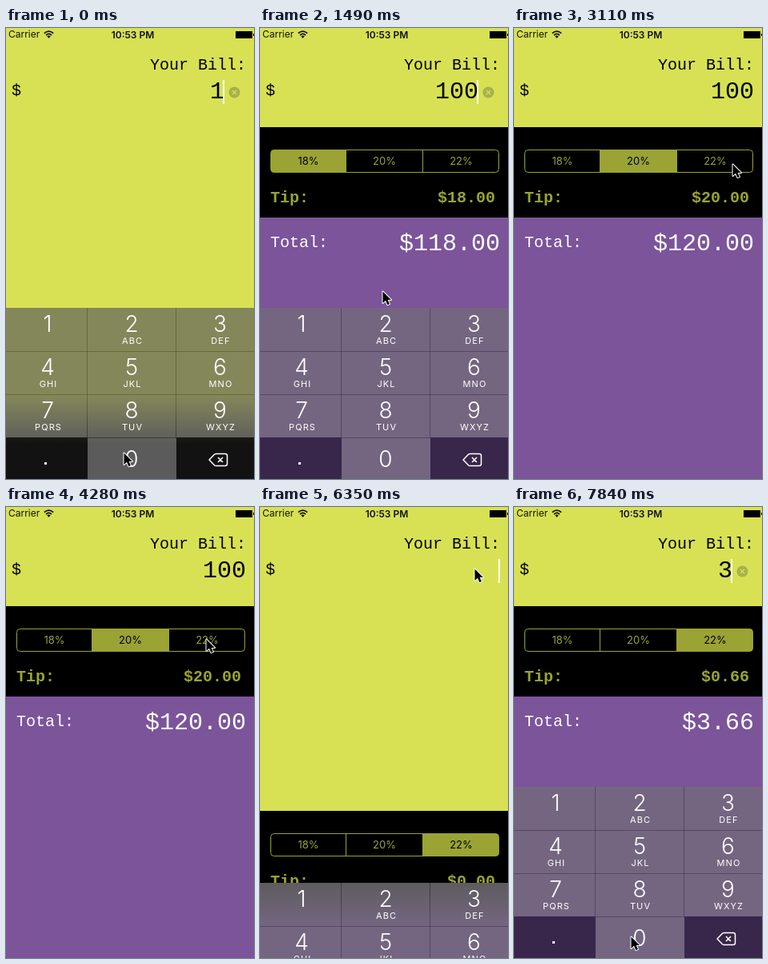
Write an HTML page with a canvas that moves like this. It is 310 by 564 pixels and loops after 7990 ms.

```html
<!DOCTYPE html>
<html lang="en">
<head>
<meta charset="utf-8">
<title>Tip calculator</title>
<style>
  html, body { margin: 0; width: 100%; height: 100%; overflow: hidden; background: #d8e154; }
  canvas { display: block; width: 310px; height: 564px; }
</style>
</head>
<body>
<canvas id="stage"></canvas>
<script>
const W = 310, H = 564, LOOP = 7990, STEPS = 54;
const MONO = '"Courier New", Courier, "Liberation Mono", monospace';
const SANS = 'Inter, Roboto, sans-serif';
const YELLOW = '#d8e154', PURPLE = '#7b549a', OLIVE = '#9aa334';
// Keyboard tints over each backdrop: yellow, black, purple
const LIGHT = ['#84875a', '#5b5b5b', '#746680'];
const DARK = ['#4d500c', '#121212', '#38264b'];

// Tracks: [step, value...], linear between entries
const panelTrack = [[0, 490], [1, 210], [2, 124], [41, 124], [42, 380], [43, 620],
  [48, 620], [49, 490], [50, 210], [51, 124]];
const keyboardTrack = [[0, 350], [10, 350], [11, 390], [12, 500], [13, 564],
  [41, 564], [42, 470], [43, 374], [44, 350]];
const pointerTrack = [[0, 147, 531], [1, 147, 533], [2, 150, 536], [7, 150, 536],
  [10, 153, 329], [13, 153, 329], [16, 152, 165], [18, 152, 165], [21, 273, 170],
  [23, 250, 200], [25, 238, 206], [26, 238, 206], [29, 250, 165], [31, 250, 165],
  [34, 41, 169], [35, 41, 169], [36, 80, 120], [37, 165, 70], [38, 245, 54],
  [39, 268, 77], [43, 268, 77], [47, 268, 372], [49, 268, 372], [52, 152, 528], [53, 146, 537]];
// Switches: [step, value], held until the next entry
const billTrack = [[0, '1'], [2, '10'], [6, '100'], [42, ''], [49, '3']];
const rateTrack = [[0, 0], [17, 1], [30, 2]];
const editTrack = [[0, true], [11, false], [42, true]];
const pressTrack = [[0, ''], [1, '0'], [2, ''], [5, '0'], [6, ''], [48, '3'], [49, '']];

const RATES = [18, 20, 22];
const LETTERS = ['', 'ABC', 'DEF', 'GHI', 'JKL', 'MNO', 'PQRS', 'TUV', 'WXYZ'];
const COLS = [0, 102, 213, W], CENTERS = [52, 157, 267.5], ROW = 54;

const canvas = document.getElementById('stage');
const ctx = canvas.getContext('2d');
const scale = window.devicePixelRatio || 1;
canvas.width = W * scale;
canvas.height = H * scale;

const held = (track, step) => track.filter(k => k[0] <= step).pop()[1];

function glide(track, step) {
  const i = track.findIndex(k => k[0] > step);
  if (i < 0) return track[track.length - 1].slice(1);
  const a = track[i - 1], b = track[i], p = (step - a[0]) / (b[0] - a[0]);
  return a.slice(1).map((v, j) => v + (b[j + 1] - v) * p);
}

function rect(x, y, w, h, color) {
  ctx.fillStyle = color;
  ctx.fillRect(x, y, w, h);
}

function text(str, x, y, font, color, align = 'left', spacing = 0) {
  ctx.font = font;
  ctx.fillStyle = color;
  ctx.textAlign = align;
  ctx.letterSpacing = spacing + 'px';
  ctx.fillText(str, x, y);
}

function stroke(color, width, path) {
  ctx.strokeStyle = color;
  ctx.lineWidth = width;
  ctx.stroke(new Path2D(path));
}

function statusBar() {
  text('Carrier', 3, 12, `12px ${SANS}`, '#111');
  text('10:53 PM', 158.5, 12.5, `600 12px ${SANS}`, '#111', 'center');
  stroke('#111', 1.7, 'M47.8 6.6Q53.5 1.5 59.2 6.6M50 9Q53.5 5.8 57 9');
  ctx.fillStyle = '#111';
  ctx.fill(new Path2D('M51.3 10.4Q53.5 8.6 55.7 10.4L53.5 12.7Z'));
  rect(287, 4, 21, 9, '#000');
  rect(309, 7, 1, 3, '#000');
}

function billField(bill, editing) {
  text('Your Bill:', 300, 52, `20px ${MONO}`, '#000', 'right');
  text('$', 7, 84, `20px ${MONO}`, '#000');
  const clearable = editing && bill;
  text(bill, clearable ? 273 : 300, 88, `30px ${MONO}`, '#000', 'right');
  if (editing) rect(clearable ? 271 : 298, 65, 2, 30, '#fff');
  if (clearable) {
    ctx.fillStyle = '#a9b04d';
    ctx.beginPath();
    ctx.arc(285.5, 80.5, 7, 0, 7);
    ctx.fill();
    stroke(YELLOW, 1.2, 'M283 78l5 5m0 -5l-5 5');
  }
}

function resultPanel(top, bill, selected) {
  const tip = bill * RATES[selected] / 100, money = v => '$' + v.toFixed(2);
  const edges = [13, 107.5, 203.5, 299];
  ctx.save();
  ctx.translate(0, top - 124);
  rect(0, 124, W, 113, '#000');
  rect(0, 237, W, 600, PURPLE);
  ctx.save();
  ctx.beginPath();
  ctx.roundRect(13.5, 152.5, 285, 28, 4);
  ctx.clip();
  rect(edges[selected], 152, edges[selected + 1] - edges[selected], 29, OLIVE);
  ctx.restore();
  ctx.strokeStyle = OLIVE;
  ctx.lineWidth = 1;
  ctx.stroke();
  stroke(OLIVE, 1, 'M107.5 152V181M203.5 152V181');
  RATES.forEach((rate, i) => text(rate + '%', [60.5, 155.5, 251.5][i], 171,
    `13px ${SANS}`, i === selected ? '#000' : OLIVE, 'center'));
  text('Tip:', 13, 218, `bold 20px ${MONO}`, OLIVE);
  text(money(tip), 294, 218, `bold 20px ${MONO}`, OLIVE, 'right');
  text('Total:', 13, 274, `20px ${MONO}`, '#fff');
  text(money(Number(bill) + tip), 300, 278, `30px ${MONO}`, '#fff', 'right');
  ctx.restore();
}

// Blurred backdrop: the panel edges show through the keys as soft transitions
function backdrop(tints, panelTop) {
  const g = ctx.createLinearGradient(0, panelTop - 30, 0, panelTop + 143);
  [[0, 0], [60 / 173, 1], [113 / 173, 1], [1, 2]].forEach(([p, i]) => g.addColorStop(p, tints[i]));
  return g;
}

function keyboard(top, panelTop, pressed) {
  if (top >= H) return;
  const light = backdrop(LIGHT, panelTop), dark = backdrop(DARK, panelTop);
  const labels = [...'123456789.0', 'del'];
  labels.forEach((label, i) => {
    const col = i % 3, y = top + Math.floor(i / 3) * ROW, x = CENTERS[col];
    const isDark = label === '.' || label === 'del' || label === pressed;
    rect(COLS[col], y, COLS[col + 1] - COLS[col], ROW, isDark ? dark : light);
    if (label === 'del') {
      ctx.save();
      ctx.translate(253, y + 20);
      ctx.lineJoin = 'round';
      stroke('#fff', 1.5, 'M1 8L7.5 1.2Q8.3 .5 9.5 .5H21Q23.5 .5 23.5 3V13Q23.5 15.5 21 15.5H9.5Q8.3 15.5 7.5 14.8ZM12 5l6 6m0 -6l-6 6');
      ctx.restore();
    } else if (label === '.') {
      rect(48, y + 31, 3, 3, '#fff');
    } else {
      text(label, x, y + (i > 8 ? 37 : 30), `300 28px ${SANS}`, '#fff', 'center');
      text(LETTERS[i] || '', x + 1, y + 45, `11px ${SANS}`, '#fff', 'center', 1.1);
    }
  });
  ctx.globalAlpha = 0.5;
  for (let r = 1; r < 4; r++) rect(0, top + r * ROW, W, 1, dark);
  rect(101, top, 1, 3 * ROW, dark);
  rect(212, top, 1, 3 * ROW, dark);
  ctx.globalAlpha = 1;
}

function pointer([x, y]) {
  const arrow = 'M0.5 0.5V15L4 11.8L6.4 17.2L8.9 16.1L6.6 10.9H11Z';
  ctx.save();
  ctx.translate(x, y);
  ctx.lineJoin = 'round';
  stroke('#fff', 2, arrow);
  ctx.fillStyle = '#000';
  ctx.fill(new Path2D(arrow));
  ctx.restore();
}

function draw(now) {
  const step = Math.floor((now % LOOP + 12) * STEPS / LOOP) % STEPS;
  const [panelTop] = glide(panelTrack, step), [keysTop] = glide(keyboardTrack, step);
  const bill = held(billTrack, step);
  ctx.setTransform(scale, 0, 0, scale, 0, 0);
  rect(0, 0, W, H, YELLOW);
  statusBar();
  billField(bill, held(editTrack, step));
  resultPanel(panelTop, bill, held(rateTrack, step));
  keyboard(keysTop, panelTop, held(pressTrack, step));
  pointer(glide(pointerTrack, step));
}

let start;
function tick(now) {
  start ??= now;
  draw(now - start);
  requestAnimationFrame(tick);
}
draw(0);
requestAnimationFrame(tick);
</script>
</body>
</html>
```
